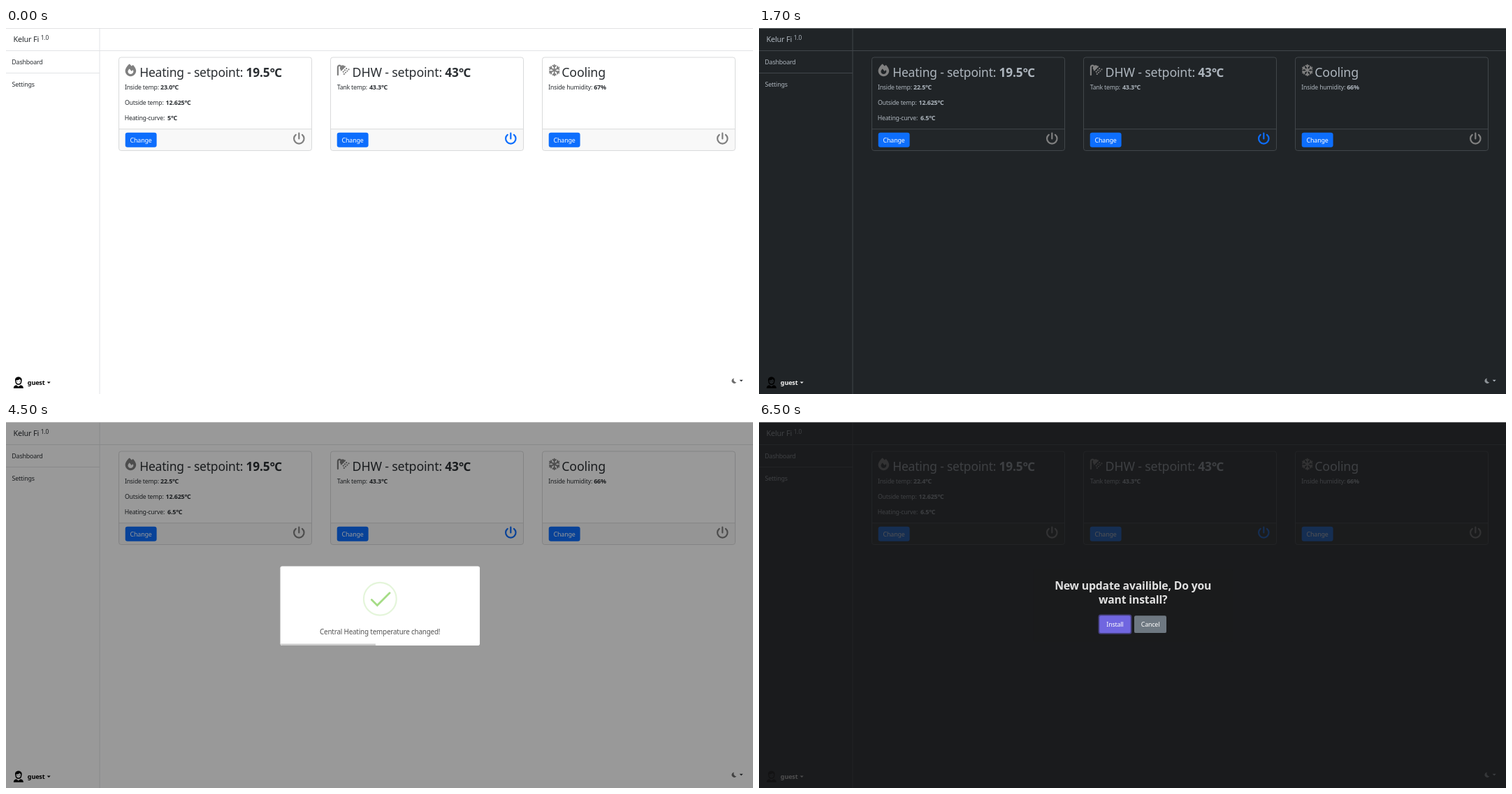
An HTML page for the animation above (8 s loop, 1069 px wide and 524 px high).

```html
<!DOCTYPE html>
<html lang="en">
<head>
<meta charset="utf-8">
<title>Heat pump dashboard</title>
<style>
  html, body { margin: 0; width: 100%; height: 100%; overflow: hidden; }
  svg {
    display: block; width: 100vw; height: 100vh;
    font: 8.9px "Noto Sans", "Noto Sans CJK SC", "Noto Sans CJK JP", sans-serif;
    letter-spacing: -.02em;
    --bg: #fff; --ink: #2a2e32; --line: #e2e4e6; --edge: #d9dadb;
    --foot: #f8f8f8; --user: #000; --moon: #6c6c6c;
  }
  svg.dark {
    --bg: #202427; --ink: #adb5bd; --line: #41464b; --edge: #41464a;
    --foot: #222629; --user: #f0f0f0; --moon: #8d9297;
  }
  text { fill: var(--ink); white-space: pre; }
  .b { font-weight: 700; }
  .mid { text-anchor: middle; }
  .h { font-size: 17.8px; }
  .wide { letter-spacing: -.01em; }
  .title { font-size: 15.75px; font-weight: 700; }
  .white { fill: #fff; }
  .soft { fill: #545454; }
  .pale { fill: #e1e1e1; }
  .user { fill: var(--user); }
  .line { stroke: var(--line); }
  .icon { fill: #808080; }
  .wire { fill: none; stroke: #808080; stroke-linecap: round; stroke-linejoin: round; }
</style>
</head>
<body>
<svg id="stage" viewBox="0 0 1069 524" preserveAspectRatio="none"></svg>
<script>
const LOOP = 8000;
const BLUE = '#0d6efd', VIOLET = '#7066e0', GRAY = '#808080';
const stage = document.getElementById('stage');

const scenes = [
  { at: 0, inside: '23.0', curve: '5', humidity: 67, top: '#dfe0e1' },
  { at: 500, dark: true, inside: '22.5', curve: '6.5', humidity: 66, top: '#777a7c' },
  { at: 2500, inside: '22.5', curve: '6.5', humidity: 66, top: '#c4c4c4', dialog: sliderDialog },
  { at: 4500, inside: '22.5', curve: '6.5', humidity: 66, top: '#c4c4c4', dialog: doneDialog },
  { at: 6500, dark: true, inside: '22.4', curve: '6.5', humidity: 66, top: '#86888a', dialog: updateDialog }
];

const text = (x, y, s, cls = '', size) =>
  `<text x="${x}" y="${y}" class="${cls}"${size ? ` style="font-size:${size}px"` : ''}>${s}</text>`;
const rect = (x, y, w, h, fill, r = 0, more = '') =>
  `<rect x="${x}" y="${y}" width="${w}" height="${h}" rx="${r}" fill="${fill}" ${more}/>`;
const path = (d, more) => `<path d="${d}" ${more}/>`;
const caret = (x, y, fill) => path(`M${x} ${y}h5l-2.5 2.6z`, `fill="${fill}"`);
const row = (x, y, label, valueX, value) => text(x, y, label, '', 8.7) + text(valueX, y, value, 'b');

// Icons sit on a 512-unit grid.
const icon = (x, body) => `<g class="icon" transform="translate(${x} 51.5) scale(.0348)">${body}</g>`;

function flame() {
  return icon(170.6, path('M159 5Q173-5 187 5Q228 44 265 89Q282 66 302 47Q316 36 330 47' +
    'C395 110 448 218 448 276C448 404 348 512 224 512C98 512 0 404 0 276C0 198 70 88 159 5Z' +
    'M226 416C310 416 362 332 323 261Q313 248 300 259L275 288Q262 299 250 287L187 208Q175 196 163 208' +
    'C129 250 112 277 112 307C112 375 163 416 226 416Z', 'fill-rule="evenodd"'));
}

function shower() {
  const drops = [[256, 320], [288, 416], [320, 256], [352, 352], [384, 192], [416, 288], [480, 224]]
    .map(([x, y]) => `<circle cx="${x}" cy="${y}" r="32"/>`).join('');
  return icon(473.8, path('M32 448V132C32 70 105 40 148 84L170 106', 'class="wire" stroke-width="64"') +
    path('M151 247A111 111 0 0 1 310 88Q328 75 345 87Q357 104 345 121L185 281Q168 293 151 281Q139 264 151 247Z') +
    drops);
}

function snowflake() {
  let arms = '';
  for (let a = 0; a < 360; a += 60)
    arms += path('M0 0V-7.8M-2.2-6.6L0-4.5L2.2-6.6', `transform="rotate(${a})"`);
  return `<g class="wire" stroke-width="1.8" transform="translate(784.7 60.4)">${arms}</g>`;
}

function power(x, color) {
  return path('M-4.6-5.6A7.24 7.24 0 1 0 4.6-5.6M0-7.8V0',
    `class="wire" style="stroke:${color}" stroke-width="2.2" transform="translate(${x} 158.4)"`);
}

function avatar() {
  return path('M13 504.5C12.3 497.7 23.3 497.7 22.7 504.5L22 508.5Q20.5 511 17.8 511Q15.2 511 13.7 508.5Z' +
    'M14.5 504.3Q18 504.3 19.6 502.8Q20.5 504 21.2 504.3L20.8 507.5Q19.8 509.4 17.8 509.4Q15.9 509.4 14.9 507.5Z' +
    'M10.8 515.7Q10.8 512 14.8 511.2L17.8 513.6L20.8 511.2Q24.9 512 24.9 515.7Z', 'fill-rule="evenodd"') +
    '<circle cx="16.2" cy="505.7" r=".5"/><circle cx="19.4" cy="505.7" r=".5"/>';
}

function card(x, body, powerColor) {
  return rect(x, 42, 276, 133.5, 'var(--bg)', 3.3) +
    path(`M${x} 145h276v27.2a3.3 3.3 0 0 1-3.3 3.3h-269.4a3.3 3.3 0 0 1-3.3-3.3z`, 'fill="var(--foot)"') +
    path(`M${x} 144.7h276`, 'stroke="var(--edge)"') +
    rect(x, 42, 276, 133.5, 'none', 3.3, 'stroke="var(--edge)"') +
    rect(x + 9.2, 149.7, 44.9, 21, BLUE, 3.3) +
    text(x + 31.6, 163.5, 'Change', 'mid white') +
    power(x + 257.8, powerColor) + body;
}

function page(s) {
  const heating = flame() +
    text(191.2, 69.6, 'Heating - setpoint:', 'h', 17.45) + text(343.6, 69.6, '19.5℃', 'h b', 17.3) +
    row(169.9, 87.6, 'Inside temp:', 221, s.inside + '℃') +
    row(169.9, 109.9, 'Outside temp:', 228.6, '12.625℃') +
    row(169.7, 132.1, 'Heating-curve:', 231.1, s.curve + '℃');
  const water = shower() +
    text(495.6, 69.6, 'DHW - setpoint:', 'h wide') + text(628.3, 69.6, '43℃', 'h b', 17.3) +
    row(473.7, 87.6, 'Tank temp:', 519.9, '43.3℃');
  const cooling = snowflake() +
    text(795.3, 69.6, 'Cooling', 'h wide') +
    row(776.2, 87.6, 'Inside humidity:', 841.2, s.humidity + '%');

  return rect(0, 0, 1069, 524, 'var(--bg)') +
    path('M0 32.5H1069M134 0V524M0 64.5H134', 'class="line"') +
    text(10.4, 20, 'Kelur Fi', '', 10.9) + text(49.8, 16.6, '1.0', '', 8.3) +
    text(8.3, 51.8, 'Dashboard') + text(8.5, 83.7, 'Settings') +
    avatar() + text(30.8, 511, 'guest', 'b user', 9.1) + caret(58.7, 506.4, 'var(--user)') +
    path('M1042 501.5A3.7 3.7 0 1 0 1045.3 507.2A3.7 3.7 0 0 1 1042 501.5Z', 'fill="var(--moon)"') +
    caret(1049.7, 503.7, 'var(--ink)') +
    card(161.5, heating, GRAY) + card(464.5, water, BLUE) + card(767.5, cooling, GRAY);
}

const button = (x, y, w, label, fill, focused) =>
  (focused ? rect(x - 1.7, y - 1.7, w + 3.4, 28.2, VIOLET, 3.6, 'opacity=".5"') : '') +
  rect(x, y, w, 24.8, fill, 2.2) + text(x + w / 2, y + 15.9, label, 'mid white');

const veil = fill => rect(0, 0, 1069, 524, fill);
const shade = veil('rgba(0,0,0,.4)');

function sliderDialog() {
  return shade + rect(392.5, 201.5, 285.5, 123, '#fff', 2.8) +
    text(535.2, 231, 'Change temperature', 'mid title soft') +
    rect(411.3, 255.2, 198, 4, '#efefef', 2, 'stroke="#b8b8b8" stroke-width=".6"') +
    rect(411, 254.9, 83.5, 4.6, '#0075ff', 2.3) +
    '<circle cx="494.5" cy="257.2" r="4.4" fill="#0075ff"/>' +
    text(635.2, 260.8, '19.5', 'mid b soft', 10.2) +
    button(519, 286.2, 32.5, 'OK', VIOLET, true);
}

function doneDialog() {
  return shade + rect(392.5, 206.5, 285.5, 113.5, '#fff', 2.8) +
    '<circle cx="535.3" cy="253.3" r="23.4" fill="none" stroke="#a5dc86" stroke-opacity=".3" stroke-width="2.2"/>' +
    path('M523.3 254.5L531.3 262.5L549 244.8',
      'fill="none" stroke="#a5dc86" stroke-width="2.8" stroke-linecap="round"') +
    text(535.2, 303.5, 'Central Heating temperature changed!', 'mid soft', 9.85) +
    path('M392.5 317.6H529V320H395.3Q393 320 392.5 317.6Z', 'fill="#ccc"');
}

function updateDialog() {
  return veil('rgba(25,25,26,.75)') + rect(392.5, 210, 285.5, 105, '#1a1b1c', 2.8) +
    text(535.2, 239.7, 'New update availible, Do you', 'mid title pale') +
    text(535.2, 259.7, 'want install?', 'mid title pale') +
    button(487.2, 277.3, 44.5, 'Install', VIOLET, true) +
    button(537, 277.3, 46, 'Cancel', '#6e7881');
}

let shown;
function render(t) {
  const scene = scenes.filter(s => s.at <= t).pop();
  if (scene === shown) return;
  shown = scene;
  stage.setAttribute('class', scene.dark ? 'dark' : '');
  stage.innerHTML = page(scene) + (scene.dialog ? scene.dialog() : '') +
    rect(0, 0, 1069, 0.9, scene.top);
}

const start = performance.now();
function tick() {
  render((performance.now() - start) % LOOP);
  requestAnimationFrame(tick);
}
tick();
</script>
</body>
</html>
```
